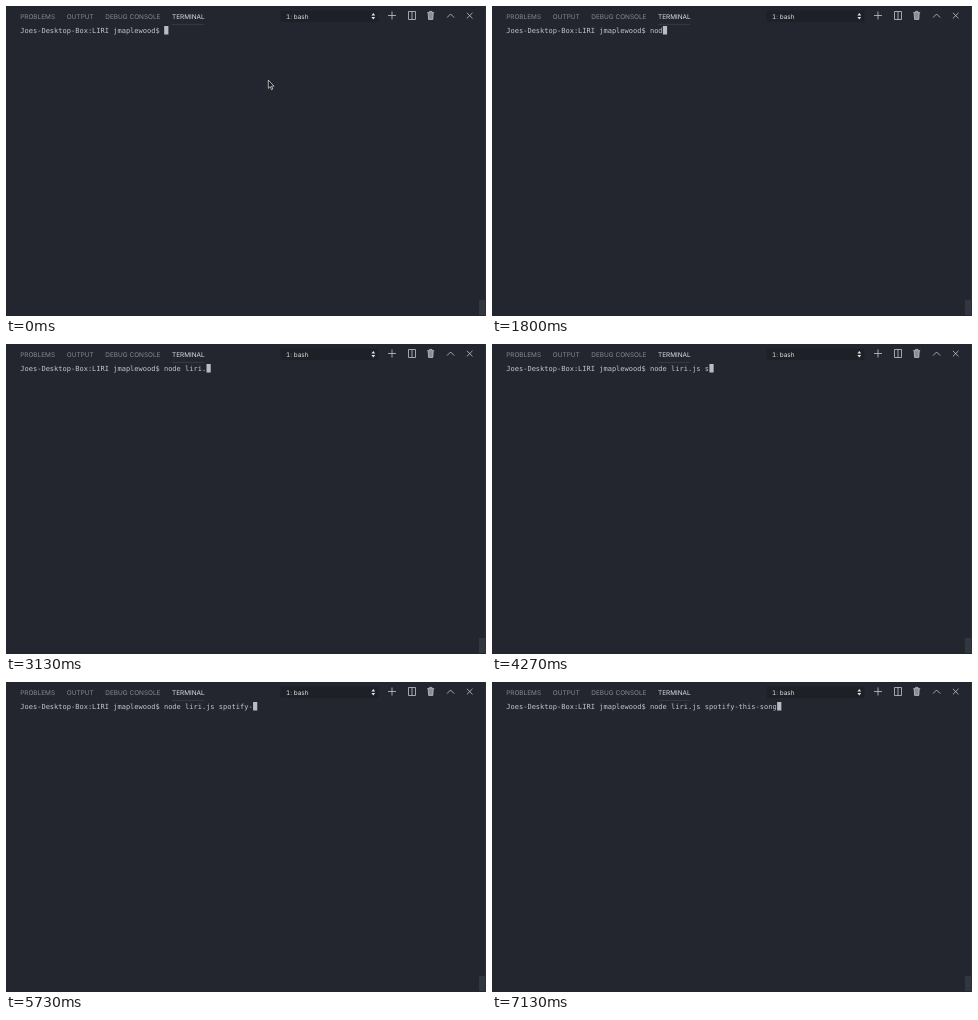
An HTML page for the animation above (8 s loop, 480x310 px).

```html
<!DOCTYPE html>
<html lang="en">
<head>
<meta charset="utf-8">
<title>Terminal</title>
<style>
  html, body { margin: 0; width: 100%; height: 100%; overflow: hidden; background: #23262f; }
  svg { display: block; }
  text { font: 6.44px Inter, sans-serif; fill: #858990; white-space: pre; text-rendering: geometricPrecision; }
  .active { fill: #dddfe2; font-variant-numeric: tabular-nums; }
  #line { font: 7.03px "DejaVu Sans Mono", monospace; fill: #c3c6cb; }
  .icons { fill: none; stroke: #c4c6c9; stroke-width: .8; }
</style>
</head>
<body>
<svg width="480" height="310" viewBox="0 0 480 310">
  <path d="M479.5 0V310" stroke="#2b3038"/>
  <rect x="473" y="294" width="6" height="15" fill="#32363e"/>

  <text x="14.2" y="12.8">PROBLEMS</text>
  <text x="60.8" y="12.8">OUTPUT</text>
  <text x="99.3" y="12.8">DEBUG CONSOLE</text>
  <text x="166" y="12.8" class="active">TERMINAL</text>
  <path d="M166 18.4H198" stroke="#444850" stroke-width=".6"/>

  <rect x="274.5" y="4.5" width="98" height="11.5" rx="1" fill="#1d2027"/>
  <text x="280" y="12.8" class="active">1: bash</text>
  <path d="M365.4 9.6l1.9-2.5 1.9 2.5zM365.4 10.9l1.9 2.5 1.9-2.5z" fill="#e2e3e5"/>

  <g class="icons">
    <path d="M382 9.5H390M386 5.5V13.5"/>
    <path d="M402.5 5.5H409.5V13.5H402.5zM406 5.5V13.5"/>
    <path d="M421.2 6.6H428.2M423.4 6.4V5.4H426V6.4"/>
    <path d="M422.2 7L422.6 13.4H426.8L427.2 7" fill="#8b8e94"/>
    <path d="M441 11.6L444.6 8L448.2 11.6"/>
    <path d="M460.9 6.8L466.5 12.4M466.5 6.8L460.9 12.4"/>
  </g>

  <text id="line" x="14.3" y="26.6"></text>
  <rect id="caret" y="20" width="4.2" height="8.5" fill="#b9bcc2"/>
  <path id="pointer" d="M262.3 74V82.4L264.2 80.6L265.5 83.7L266.8 83.1L265.5 80.2H268z"
        fill="#16181c" stroke="#e6e6e6" stroke-width=".7"/>
</svg>
<script>
  const LOOP = 8000, CHAR = 4.232, LEFT = 14.3, POINTER_HIDES = 1400;
  const prompt = "Joes-Desktop-Box:LIRI jmaplewood$ ";
  // Each burst is typed at an even pace
  const bursts = [
    { text: "node ", start: 1330, pace: 185 },
    { text: "liri", start: 2330, pace: 113 },
    { text: ".js", start: 3130, pace: 200 },
    { text: " spotify", start: 4070, pace: 143 },
    { text: "-this-song", start: 5730, pace: 155 }
  ];
  const [line, caret, pointer] = ["line", "caret", "pointer"].map(id => document.getElementById(id));

  const typedBy = (t, { text, start, pace }) =>
    text.slice(0, Math.max(0, Math.floor((t - start) / pace) + 1));

  function draw(t) {
    const shown = prompt + bursts.map(burst => typedBy(t, burst)).join("");
    line.textContent = shown;
    caret.setAttribute("x", LEFT + shown.length * CHAR);
    pointer.style.display = t < POINTER_HIDES ? "" : "none";
  }

  const start = performance.now();
  function tick() {
    draw((performance.now() - start) % LOOP);
    requestAnimationFrame(tick);
  }
  tick();
</script>
</body>
</html>
```
